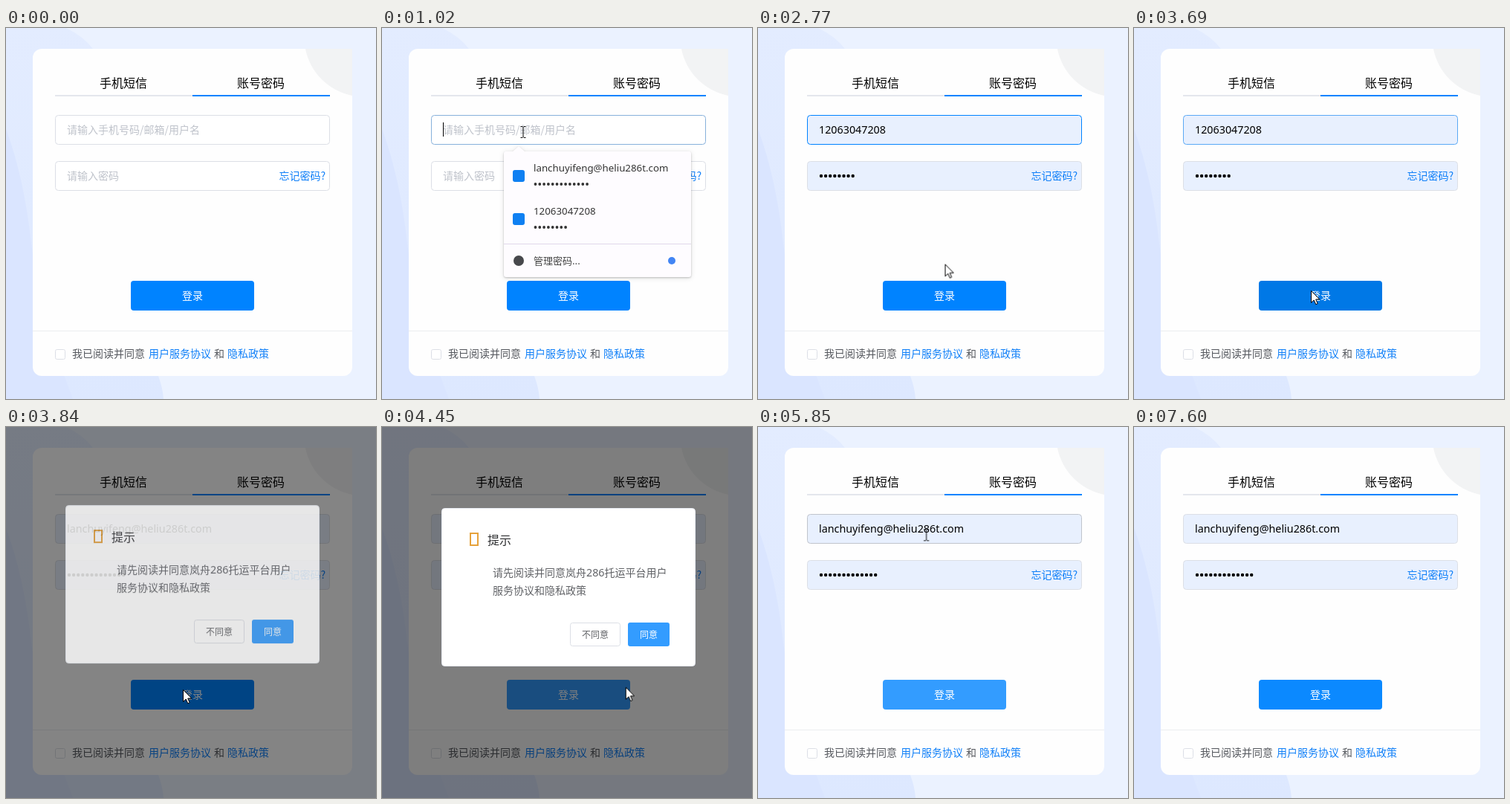
These frames come from a looping animation (498 px wide and 499 px high, 7.7 s). An HTML page:

```html
<!DOCTYPE html>
<html lang="zh-CN">
<head>
<meta charset="utf-8">
<title>登录</title>
<style>
html, body { margin: 0; width: 100%; height: 100%; overflow: hidden; background: #ebf2ff; }
svg { display: block; width: 498px; height: 499px; }
text { font: 14px "Noto Sans CJK SC", "Noto Sans CJK", sans-serif; white-space: pre; }
.tab { font-size: 16px; }
.hint { fill: #bfc3cb; }
.link { fill: #0f7ff8; }
.value { font: 14.3px "Noto Sans", sans-serif; }
.preview { font: 13.33px "Liberation Sans", Arial, sans-serif; }
.item { font: 13.3px "Noto Sans", sans-serif; fill: #333; }
.small { font-size: 12px; }
.dots { fill: none; stroke: #000; stroke-width: 4.4; stroke-linecap: round; stroke-dasharray: 0 6.1; }
.dots.tight { stroke-width: 3.8; stroke-dasharray: 0 4.67; }
.dots.list { stroke: #333; stroke-width: 3.8; stroke-dasharray: 0 5.8; }

/* one 7.7 s timeline: 1% = 77 ms */
.on { animation: 7.7s step-end infinite; }
.ease { animation: 7.7s ease infinite; }
.line { animation: 7.7s linear infinite; }

.empty { animation-name: empty; }
.fill { animation-name: fill; }
.first { animation-name: first; }
.second { animation-name: second; }
.phone { animation-name: phone; }
.mail { animation-name: mail; }
.caret { animation-name: caret; }
.popup { animation-name: popup; filter: drop-shadow(0 1px 1px rgba(0,0,0,.2)) drop-shadow(0 1px 3px rgba(0,0,0,.12)); }
.border { animation-name: border; }
.login { animation-name: login; }
.shade { animation-name: shade; }
.dialog { animation-name: dialog; }
.agree { animation-name: agree; }
.pointer { animation-name: move; }
.arrow { animation-name: arrow; }
.beam { animation-name: beam; }

@keyframes empty { 0% { opacity: 1 } 17.9%, 100% { opacity: 0 } }
@keyframes fill { 0% { fill: #fff } 17.9%, 100% { fill: #e8f0fe } }
@keyframes first { 0% { opacity: 0 } 17.9% { opacity: 1 } 22.5%, 100% { opacity: 0 } }
@keyframes second { 0% { opacity: 0 } 22.5% { opacity: 1 } 31.69%, 100% { opacity: 0 } }
@keyframes phone { 0% { opacity: 0 } 31.69% { opacity: 1 } 48.57%, 100% { opacity: 0 } }
@keyframes mail { 0% { opacity: 0 } 48.57%, 100% { opacity: 1 } }
@keyframes caret { 0% { opacity: 0 } 12.99% { opacity: 1 } 31.69%, 100% { opacity: 0 } }
@keyframes popup { 0% { opacity: 0 } 12.6% { opacity: 1 } 31.69%, 100% { opacity: 0 } }
@keyframes border {
  0%, 10.5%, 49.8%, 69.75%, 79%, 100% { stroke: #dcdfe6 }
  12%, 12.99%, 72%, 76.56% { stroke: #c0c4cc }
  13.9%, 46.62% { stroke: #0083ff }
}
@keyframes login {
  0%, 37% { fill: #0083ff }
  38.3%, 46.62% { fill: #339cff }
  47.9% { fill: #0078e6 }
  49.87% { fill: #0083ff }
  51.82%, 98.69% { fill: #339cff }
  98.7%, 100% { fill: #0b89ff }
}
@keyframes shade {
  0%, 47.92%, 63.9%, 100% { opacity: 0 }
  50.52%, 61.3% { opacity: .5 }
}
@keyframes dialog {
  0%, 47.92%, 65.19%, 100% { opacity: 0; transform: translateY(-20px) }
  51.82%, 61.3% { opacity: 1; transform: none }
}
@keyframes agree {
  0%, 60.5% { fill: #339cff }
  61.8%, 100% { fill: #0083ff }
}
@keyframes move {
  0%, 2.987% { transform: translate(250px, 456px) }
  6.49% { transform: translate(232px, 330px) }
  9.09% { transform: translate(208px, 200px) }
  11.04%, 16.23% { transform: translate(190px, 140px) }
  18.18% { transform: translate(205px, 175px) }
  25.58%, 31.69% { transform: translate(271px, 266px) }
  38.96%, 55.19% { transform: translate(238px, 353px) }
  60%, 62.7% { transform: translate(403px, 347px) }
  65.19% { transform: translate(324px, 272px) }
  70.78% { transform: translate(184px, 131px) }
  75.32%, 75.97% { transform: translate(226.5px, 145px) }
  77.92% { transform: translate(240px, 185px) }
  85.32% { transform: translate(146px, 484px) }
  86.62%, 100% { transform: translate(125px, 488px) }
}
@keyframes arrow {
  0%, 8.71%, 10.5%, 67.3%, 69.75%, 77.6%, 87.27%, 100% { opacity: 0 }
  2.987%, 9.53%, 17.18%, 68.9%, 76.56%, 78.8% { opacity: 1 }
}
@keyframes beam {
  0%, 9.53%, 17.18%, 68.9%, 76.56%, 78.8%, 100% { opacity: 0 }
  8.71%, 10.5%, 67.3%, 69.75%, 77.6% { opacity: 1 }
}
</style>
</head>
<body>
<svg viewBox="0 0 498 499">
  <defs>
    <linearGradient id="wash" x2="0" y2="1">
      <stop stop-color="#e3ecff"/>
      <stop offset="1" stop-color="#dde8ff"/>
    </linearGradient>
  </defs>

  <!-- backdrop -->
  <rect width="498" height="499" fill="#ebf2ff"/>
  <path d="M0 0H81Q104 11 117 28C190 130 140 330 205 468Q211 484 212 499H0Z" fill="url(#wash)"/>
  <path d="M0 136Q24 200 34 290T90 499H0Z" fill="#dae5ff"/>

  <!-- card -->
  <rect x="36" y="28" width="430" height="440" rx="12" fill="#fefefe"/>
  <path d="M403 28A80 80 0 0 0 466 91V28Z" fill="#f2f3f4"/>
  <text class="tab" x="126" y="80">手机短信</text>
  <text class="tab" x="311" y="80">账号密码</text>
  <path d="M66 91H251" stroke="#e4e7ed" stroke-width="2"/>
  <path d="M251 91H436" stroke="#0083ff" stroke-width="2"/>

  <!-- fields -->
  <rect class="on fill" x="66.5" y="117.5" width="369" height="39" rx="4"/>
  <rect class="on fill" x="66.5" y="179.5" width="369" height="39" rx="4"/>
  <rect class="line border" x="66.5" y="117.5" width="369" height="39" rx="4" fill="none"/>
  <rect x="66.5" y="179.5" width="369" height="39" rx="4" fill="none" stroke="#dcdfe6"/>
  <g class="on empty">
    <text class="hint" x="82" y="142">请输入手机号码/邮箱/用户名</text>
    <text class="hint" x="82" y="204">请输入密码</text>
  </g>
  <g class="on first">
    <text class="preview" x="82" y="142">lanchuyifeng@heliu286t.com</text>
    <path class="dots tight" d="M84.5 199h57"/>
  </g>
  <g class="on second">
    <text class="preview" x="82" y="142">12063047208</text>
    <path class="dots tight" d="M84.5 199h33"/>
  </g>
  <g class="on phone">
    <text class="value" x="82" y="142">12063047208</text>
    <path class="dots" d="M85 199h43"/>
  </g>
  <g class="on mail">
    <text class="value" x="82" y="142">lanchuyifeng@heliu286t.com</text>
    <path class="dots" d="M85 199h73.5"/>
  </g>
  <path class="on caret" d="M82.5 127V146" stroke="#000"/>
  <text class="link" x="367.5" y="204">忘记密码?</text>

  <!-- submit and terms -->
  <rect class="line login" x="168" y="340" width="166" height="40" rx="4"/>
  <text x="251" y="365" text-anchor="middle" fill="#fff">登录</text>
  <path d="M36 407.5H466" stroke="#ebedf0"/>
  <rect x="66.5" y="432.5" width="13" height="13" rx="2" fill="#fff" stroke="#dcdfe6"/>
  <g fill="#55585e">
    <text x="89" y="443">我已阅读并同意</text>
    <text class="link" x="192" y="443">用户服务协议</text>
    <text x="280" y="443">和</text>
    <text class="link" x="298" y="443">隐私政策</text>
  </g>

  <!-- saved logins -->
  <g class="on popup">
    <path d="M167 166H176L184 159L192 166H413Q416 166 416 169V332Q416 335 413 335H167Q164 335 164 332V169Q164 166 167 166Z" fill="#fefcff"/>
    <rect class="on first" x="164" y="170" width="252" height="58" fill="#efedf0"/>
    <rect class="on second" x="164" y="228" width="252" height="58" fill="#efedf0"/>
    <rect x="176" y="191" width="16" height="16" rx="3" fill="#0f80f2"/>
    <rect x="176" y="249" width="16" height="16" rx="3" fill="#0f80f2"/>
    <text class="item" x="204" y="193">lanchuyifeng@heliu286t.com</text>
    <path class="dots list" d="M206.5 210h70"/>
    <text class="item" x="204" y="251">12063047208</text>
    <path class="dots list" d="M206.5 268h41"/>
    <path d="M164 290.5H416" stroke="#e0d8ea"/>
    <circle cx="184" cy="313" r="7" fill="#47484c"/>
    <text x="204" y="317.5" fill="#444" style="font-size:13px">管理密码...</text>
    <circle cx="390" cy="313" r="5" fill="#4285f4"/>
  </g>

  <!-- consent dialog -->
  <rect class="ease shade" width="498" height="499"/>
  <g class="ease dialog">
    <rect x="80.5" y="109.5" width="341" height="212" rx="4" fill="#fff" stroke="#ebeef5"/>
    <rect x="119" y="143" width="10" height="16" fill="none" stroke="#e6a23c" stroke-width="2"/>
    <text class="tab" x="142" y="158" fill="#303133" style="font-weight:500">提示</text>
    <g fill="#606266">
      <text x="149" y="201">请先阅读并同意岚舟<tspan class="value">286</tspan>托运平台用户</text>
      <text x="149" y="225">服务协议和隐私政策</text>
      <rect x="253.5" y="263.5" width="67" height="31" rx="3" fill="#fff" stroke="#dcdfe6"/>
      <text class="small" x="287" y="283.5" text-anchor="middle">不同意</text>
    </g>
    <rect class="line agree" x="331" y="263" width="56" height="32" rx="3"/>
    <text class="small" x="359" y="283.5" text-anchor="middle" fill="#fff">同意</text>
  </g>

  <!-- pointer -->
  <g class="line pointer">
    <path class="on arrow" d="M.5 .5V16.5L4.2 13L6.8 18.8L9.2 17.7L6.7 12H11.8Z" fill="#fff" stroke="#000"/>
    <path class="on beam" d="M-3.5 -7.5H-1L0 -6.5L1 -7.5H3.5M0 -6.5V6.5M-3.5 7.5H-1L0 6.5L1 7.5H3.5" fill="none" stroke="#000"/>
  </g>
</svg>
</body>
</html>
```
